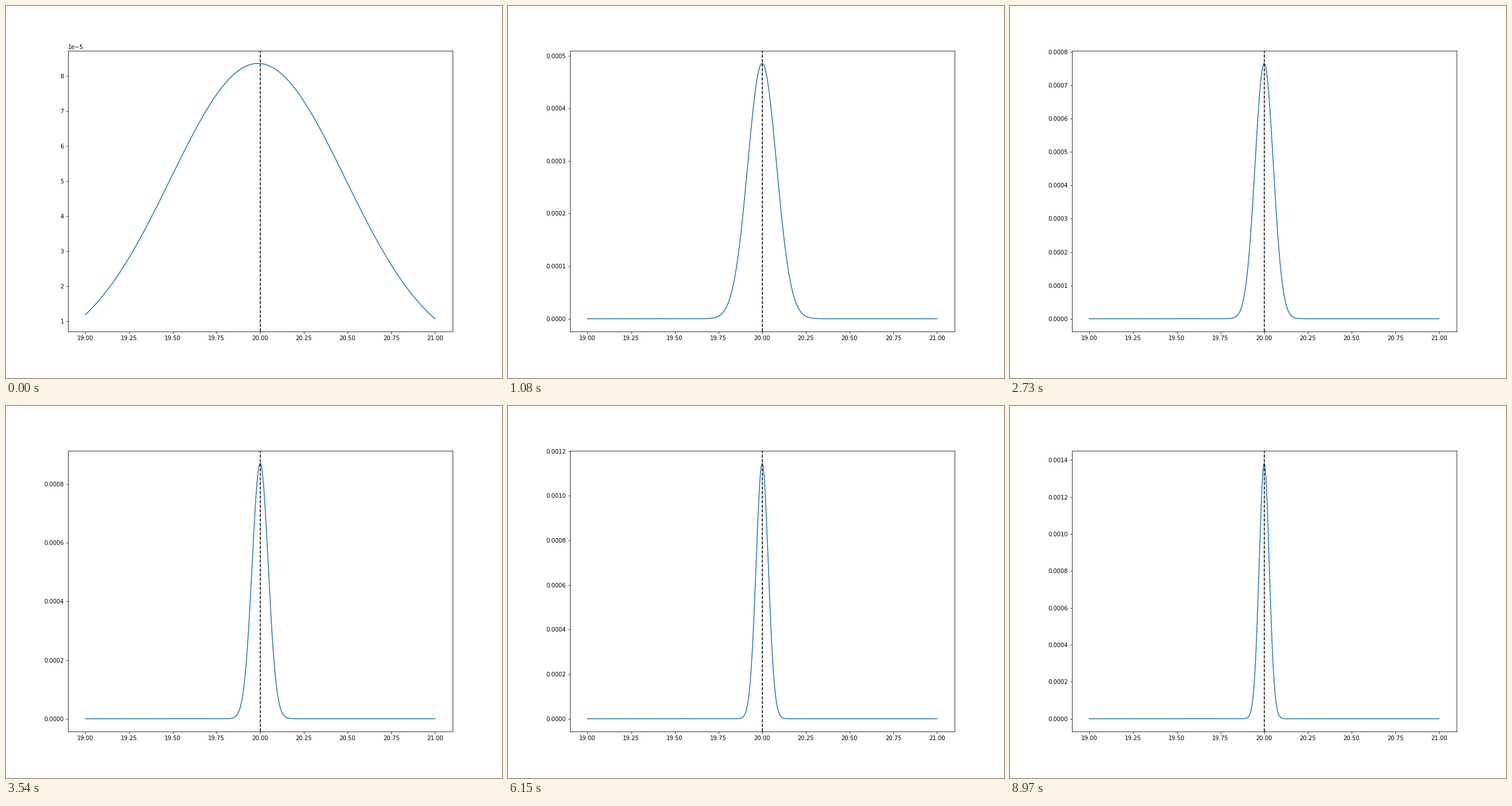
Recreate the animation shown at these times as a matplotlib script. Size 864x648 px, loop 9000 ms.

```python
import numpy as np
import matplotlib.pyplot as plt
from matplotlib.animation import FuncAnimation

FRAMES = 300
INTERVAL = 30
TRUE_MEAN = 20
SIGMA = 0.5
FIRST_BIAS = -0.013
STEP = 1e-4  # cell width of the probability grid

x = np.linspace(19, 21, 2001)


def posterior(n):
    """Probability per grid cell for the mean after n observations."""
    mean = TRUE_MEAN + FIRST_BIAS / n
    p = np.exp(-n * (x - mean) ** 2 / (2 * SIGMA ** 2))
    return p / p.sum() * STEP / (x[1] - x[0])


plt.rcParams["font.family"] = "DejaVu Sans"
fig, ax = plt.subplots(figsize=(12, 9), dpi=72)
fig.subplots_adjust(left=0.125, right=0.9, bottom=0.125, top=0.88)
curve, = ax.plot(x, posterior(1))
ax.axvline(TRUE_MEAN, color="k", linestyle="--")
ax.set_xlim(18.9, 21.1)


def update(frame):
    p = posterior(frame + 1)
    curve.set_ydata(p)
    low, high = p.min(), p.max()
    pad = 0.05 * (high - low)
    ax.set_ylim(low - pad, high + pad)
    return curve,


anim = FuncAnimation(fig, update, frames=FRAMES, interval=INTERVAL,
                     repeat=True, repeat_delay=0, blit=False)
plt.show()
```
